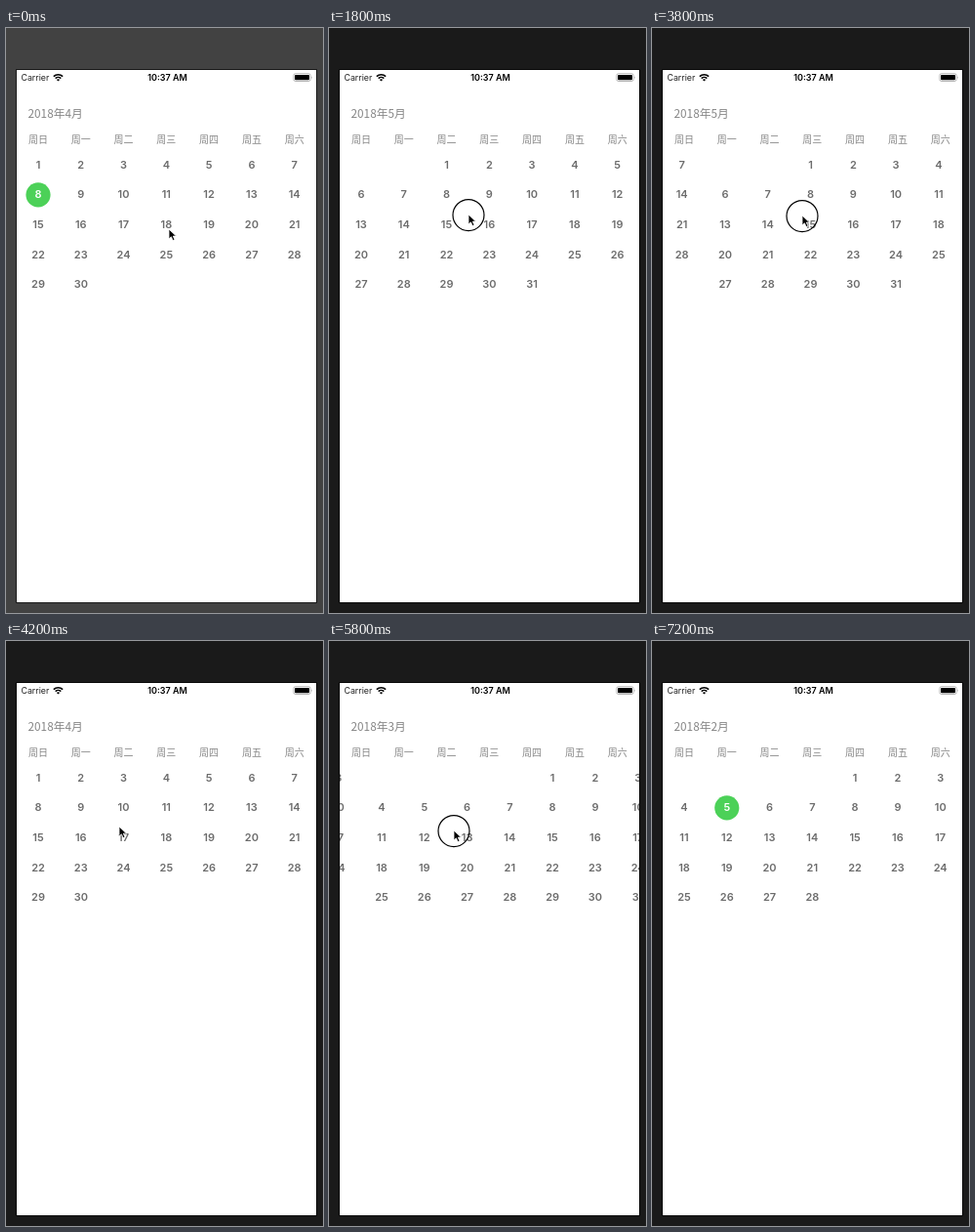
Write an HTML page that moves like this. It is 325 by 599 pixels and loops after 7300 ms.

```html
<!DOCTYPE html>
<html lang="zh">
<head>
<meta charset="utf-8">
<title>Calendar</title>
<style>
html, body { margin: 0; width: 100%; height: 100%; overflow: hidden; background: #1a1a1a; }
svg { display: block; width: 325px; height: 599px; }
text { font-family: Inter, Roboto, sans-serif; }
.cjk { font-family: "Noto Sans CJK SC", "Noto Sans CJK", "Noto Sans CJK JP", sans-serif; fill: #858585; }
.title { font-size: 11.8px; }
.week { font-size: 10px; text-anchor: middle; }
.day { font-size: 11px; font-weight: 600; text-anchor: middle; fill: #6c6c6c; }
.day.on { fill: #fff; }
.status { font-size: 8.8px; fill: #222; }
.clock { font-size: 9px; font-weight: 600; text-anchor: middle; fill: #000; }
</style>
</head>
<body>
<svg viewBox="0 0 325 599">
  <defs><clipPath id="screen"><rect x="11" y="43" width="307" height="545"/></clipPath></defs>
  <rect id="desk" width="325" height="599"/>
  <rect x="10" y="42" width="309" height="547" fill-opacity=".6"/>
  <rect x="11" y="43" width="307" height="545" fill="#fff"/>
  <text class="status" x="15.5" y="54">Carrier</text>
  <g fill="none" stroke="#000" stroke-width="1.5">
    <path d="M48.8 49.6a6.6 6.6 0 0 1 9.4 0M50.7 51.6a4 4 0 0 1 5.6 0"/>
    <path d="M53.5 54.6l-1.6-1.7a2.3 2.3 0 0 1 3.2 0z" fill="#000" stroke="none"/>
  </g>
  <text class="clock" x="165.5" y="54">10:37 AM</text>
  <rect x="294.8" y="46.7" width="17.4" height="7.8" rx="2" fill="none" stroke="#999" stroke-width=".7"/>
  <rect x="296" y="48" width="15" height="5.3" rx="1"/>
  <path d="M313 49.4q1.3 1.3 0 2.6z" fill="#999"/>
  <text class="cjk title" id="title" x="22.5" y="92"></text>
  <g id="weekdays"></g>
  <g clip-path="url(#screen)"><g id="track"></g></g>
  <g id="pointer">
    <circle id="ring" cy=".6" r="16" fill="none" stroke="#000" stroke-width="1.2"/>
    <path d="M0 0v10l2.4-2.2 1.7 3.8 1.9-.8-1.7-3.7h3.2z" fill="#000" stroke="#fff" stroke-width=".8"/>
  </g>
</svg>
<script>
const LOOP = 7300, STEP = 100, PAGE = 307;
const FIRST = 2, LAST = 6, START = 4;
const TAP = 200, SWIPE = 300, GLIDE = 300, SETTLE = 300, REACH = 63, EXIT = 7200;
const $ = id => document.getElementById(id);
const clamp = u => Math.min(1, Math.max(0, u));
const easeOut = u => 1 - (1 - u) ** 3;
const colX = c => 33 + c * 43.78;
const rowY = r => 139.8 + r * 30.6;

const rest = (at, x, y) => ({ at, end: at, x, y, dir: 0 });
const tap = (at, x, y, pick) => ({ at, end: at + TAP, x, y, dir: 0, pick });
const swipe = (at, x, y, dir) => ({ at, end: at + SWIPE, x, y, dir });

// the pointer glides from one gesture to the next
const gestures = [
  { ...rest(0, 167, 206), pick: "4-8" },
  tap(600, 164, 172, "4-11"),
  swipe(1000, 198, 175, -1),
  tap(1700, 143, 191, "5-16"),
  swipe(2400, 203, 157, -1),
  tap(2800, 122, 174, "6-5"),
  swipe(3100, 130, 192, 1),
  swipe(3600, 112, 192, 1),
  swipe(4700, 116, 190, 1),
  swipe(5700, 107, 194, 1),
  tap(6600, 78, 172, "2-5"),
  rest(EXIT, 100, 292)
];

function add(parent, tag, attrs, text = "") {
  const el = document.createElementNS("http://www.w3.org/2000/svg", tag);
  for (const k in attrs) el.setAttribute(k, attrs[k]);
  el.textContent = text;
  return parent.appendChild(el);
}

[..."日一二三四五六"].forEach((ch, c) =>
  add($("weekdays"), "text", { class: "cjk week", x: colX(c), y: 117.6 }, "周" + ch));

const dot = add($("track"), "circle", { r: 12.6, fill: "#4cd158" });
const days = {};
for (let m = FIRST; m <= LAST; m++) {
  const lead = new Date(2018, m - 1, 1).getDay();
  const count = new Date(2018, m, 0).getDate();
  for (let d = 1; d <= count; d++) {
    const cell = lead + d - 1;
    const x = colX(cell % 7) + (m - START) * PAGE;
    const y = rowY(Math.floor(cell / 7));
    days[m + "-" + d] = { x, y, el: add($("track"), "text", { class: "day", x, y: y + 4 }, d) };
  }
}

const dragAt = (g, t) => g.dir ? g.dir * REACH * clamp((t - g.at) / SWIPE) : 0;

function pointerAt(t) {
  const i = gestures.findLastIndex(g => g.at <= t);
  const g = gestures[i], next = gestures[i + 1] || g;
  const x = g.x + dragAt(g, t);
  const span = Math.min(GLIDE, next.at - g.end) || 1;
  const u = clamp((t - g.end) / span);
  return [x + (next.x - x) * u, g.y + (next.y - g.y) * u];
}

// content follows the pointer while pressed, then eases to the next page
const scrollAt = t => gestures.reduce((sum, g) => {
  const drag = dragAt(g, t);
  return sum + drag + (g.dir * PAGE - drag) * easeOut(clamp((t - g.end) / SETTLE));
}, 0);

let chosen = null;
function choose(day) {
  if (day === chosen) return;
  if (chosen) chosen.el.classList.remove("on");
  day.el.classList.add("on");
  dot.setAttribute("cx", day.x);
  dot.setAttribute("cy", day.y + 0.4);
  chosen = day;
}

function draw(t) {
  const [px, py] = pointerAt(t);
  const scroll = scrollAt(t);
  const pressed = gestures.some(g => t > g.at && t <= g.end);

  $("desk").setAttribute("fill", t < STEP ? "#424242" : "#1a1a1a");
  $("track").setAttribute("transform", `translate(${scroll} 0)`);
  $("title").textContent = `2018年${START - Math.round(scroll / PAGE)}月`;
  $("pointer").setAttribute("transform", `translate(${px} ${py})`);
  $("pointer").setAttribute("visibility", t < EXIT ? "visible" : "hidden");
  $("ring").setAttribute("opacity", pressed ? 1 : 0);
  choose(days[gestures.findLast(g => g.pick && g.end <= t).pick]);
}

const begin = performance.now();
function tick() {
  const t = (performance.now() - begin) % LOOP;
  draw(Math.floor((t + 1) / STEP) * STEP % LOOP);
  requestAnimationFrame(tick);
}
tick();
</script>
</body>
</html>
```
